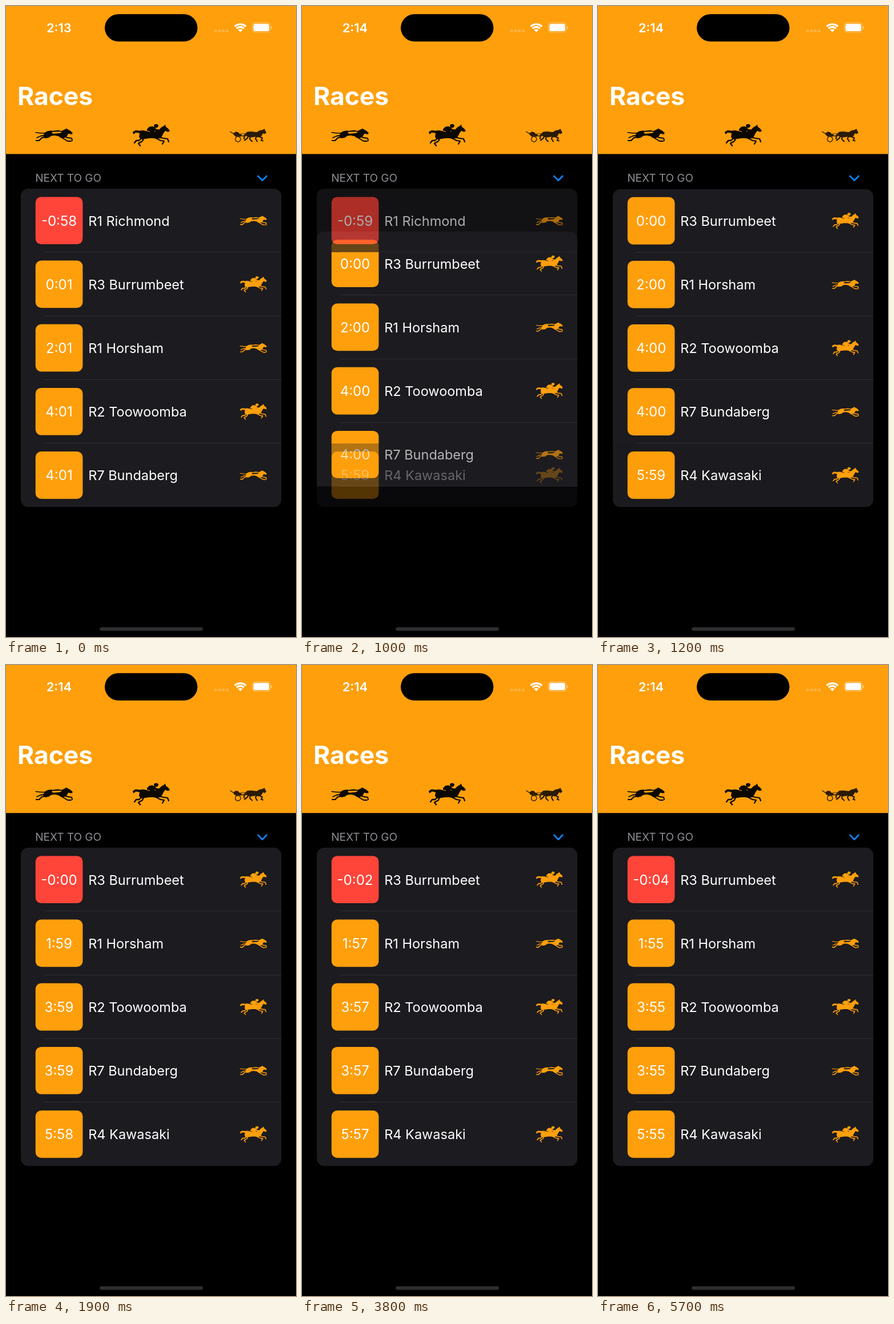
Recreate the animation shown at these times as an HTML page with a canvas. Size 508 by 1102 pixels, loop 5900 ms.

```html
<!DOCTYPE html>
<html lang="en">
<head>
<meta charset="utf-8">
<title>Races</title>
<style>
html, body { margin: 0; width: 100%; height: 100%; overflow: hidden; background: #000; }
canvas { display: block; width: 508px; height: 1102px; }
</style>
</head>
<body>
<canvas id="stage"></canvas>
<script>
const W = 508, H = 1102, LOOP = 5900, STEP = 100;
const ORANGE = '#ff9f0c', RED = '#ff453a', CARD = '#1c1b1f', RULE = '#302f33';
const FONT = 'Inter, "Liberation Sans", sans-serif';
const TOP = 319.2, ROW = 111.17, LEFT = 25.9, WIDE = 456.4;
const MOVE_AT = 859, MOVE_FOR = 356, CLOCK_AT = 700;

const ratio = window.devicePixelRatio || 1;
const makeContext = canvas => {
  canvas.width = W * ratio;
  canvas.height = H * ratio;
  const c = canvas.getContext('2d');
  c.scale(ratio, ratio);
  return c;
};
const ctx = makeContext(document.getElementById('stage'));
const layer = makeContext(document.createElement('canvas'));

// Silhouettes: filled shapes plus stroked limbs.
const icons = {
  dog: {
    height: 25,
    fill: new Path2D('M15 9C19 5 24 4 30 5L38 4L46 5L50 3L54 1L57 3L61 5L65 9L63 11L57 10L55 14L51 17C47 19 44 18 41 15C36 13 31 13 27 14L23 17L17 18L13 15Z' +
      'M28 7L30 10L43 9L46 6.5L36 6.5Z'),
    lines: [
      ['M17 9L9 9L0 8', 1.5], ['M20 16L11 17L6 22L1 22', 2.2],
      ['M16 13L9 14L2 17', 1.8], ['M50 15L56 17L63 18L64 22', 2],
      ['M46 17L51 20L56 23L62 23', 2]
    ]
  },
  horse: {
    height: 39,
    fill: new Path2D('M0 14L5 11L13 12C18 10 24 13 30 14L38 13L44 12L50 6L55 3L57 1L58 5L62 8L65 12L62 14L57 12L54 16L51 22C47 26 42 27 37 25L29 25L22 26L15 27L11 23L12 16L6 15L1 18Z' +
      'M25 9L29 5L34 4L39 6L41 9L47 10L45 13L38 12L36 17L33 21L30 19L30 13L25 12Z' +
      'M37 3A4 3.3 0 1 1 45 4L42 7L38 6Z'),
    lines: [
      ['M15 25L11 29L6 29L3 33', 2.4], ['M19 25L17 30L10 34L13 38', 2.2],
      ['M45 23L54 25L61 26L63 31', 2.2], ['M41 25L49 29L55 30L52 35', 2.2]
    ]
  },
  trot: {
    height: 24,
    fill: new Path2D('M28 6C33 4 39 5 46 6L51 3L56 2L60 0L61 3L63 6L61 9L57 8L55 12L51 15L43 14L36 15L30 14L27 10Z' +
      'M6 7L10 5L14 6L16 9L20 10L19 13L13 12L10 13L6 11Z'),
    lines: [
      ['M0 5L6 9L10 13L26 12L45 11', 1.4], ['M14 9L30 8L56 5', .8],
      ['M29 8L25 11L24 17', 2.4], ['M18 18A4.7 4.7 0 1 1 8.6 18A4.7 4.7 0 1 1 18 18', 1.3],
      ['M32 13L29 17L25 20M35 14L34 18L38 22', 2.2],
      ['M46 13L44 17L47 22M50 13L56 16L54 20L57 21', 2.2]
    ]
  }
};
for (const icon of Object.values(icons)) {
  icon.lines = icon.lines.map(([d, width]) => ({ path: new Path2D(d), width }));
}

const tickTimes = [600, 1600, 2600, 3700, 4700, 5700];
const lateTicks = [1900, 2900, 3900, 4900];
const races = [
  { name: 'R1 Richmond', left: -58.95, kind: 'dog', ticks: tickTimes },
  { name: 'R3 Burrumbeet', left: 1.05, kind: 'horse', ticks: tickTimes },
  { name: 'R1 Horsham', left: 121.05, kind: 'dog', ticks: tickTimes },
  { name: 'R2 Toowoomba', left: 241.05, kind: 'horse', ticks: tickTimes },
  { name: 'R7 Bundaberg', left: 241.05, kind: 'dog', ticks: tickTimes },
  { name: 'R4 Kawasaki', left: 359.7, kind: 'horse', ticks: lateTicks }
];

function box(c, x, y, w, h, r, color) {
  c.fillStyle = color;
  c.beginPath();
  c.roundRect(x, y, w, h, r);
  c.fill();
}

function label(c, text, x, y, size, weight = 400, color = '#fff', align = 'left') {
  c.font = `${weight} ${size}px ${FONT}`;
  c.fillStyle = color;
  c.textAlign = align;
  c.fillText(text, x, y);
}

function drawIcon(c, kind, x, y, scale, color) {
  const icon = icons[kind];
  c.save();
  c.translate(x, y);
  c.scale(scale, scale);
  c.fillStyle = c.strokeStyle = color;
  c.lineCap = c.lineJoin = 'round';
  c.fill(icon.fill);
  for (const { path, width } of icon.lines) {
    c.lineWidth = width;
    c.stroke(path);
  }
  c.restore();
}

function countdown(seconds) {
  const s = Math.floor(Math.abs(seconds));
  return (seconds < 0 ? '-' : '') + Math.floor(s / 60) + ':' + String(s % 60).padStart(2, '0');
}

function drawRow(c, race, y, time, { first, last }) {
  const left = race.left - race.ticks.filter(at => at <= time).length;
  const top = Math.round(y), bottom = Math.round(y + ROW), mid = y + 55.6;
  const a = first ? 13 : 0, b = last ? 13 : 0;
  box(c, LEFT, top, WIDE, bottom - top, [a, a, b, b], CARD);
  if (!last) {
    c.fillStyle = RULE;
    c.fillRect(67, bottom - 1, LEFT + WIDE - 67, 1);
  }
  box(c, 51.7, mid - 41.4, 82.7, 82.7, 10, left < 0 ? RED : ORANGE);
  label(c, countdown(left), 93, mid + 8.8, 24, 400, '#fff', 'center');
  label(c, race.name, 144.2, mid + 8.8, 23.5);
  const scale = 47 / 65;
  drawIcon(c, race.kind, 410, mid - icons[race.kind].height * scale / 2, scale, ORANGE);
}

// Rows that appear or vanish are blended as one group.
function fadeRow(race, y, time, ends, alpha) {
  layer.clearRect(0, 0, W, H);
  drawRow(layer, race, y, time, ends);
  ctx.globalAlpha = alpha;
  ctx.drawImage(layer.canvas, 0, 0, W, H);
  ctx.globalAlpha = 1;
}

// Cubic ease in and out with handles at .42 and .58.
function ease(x) {
  if (x <= 0 || x >= 1) return Math.min(1, Math.max(0, x));
  let lo = 0, hi = 1;
  for (let i = 0; i < 24; i++) {
    const u = (lo + hi) / 2, v = 1 - u;
    if (3 * v * v * u * .42 + 3 * v * u * u * .58 + u ** 3 < x) lo = u; else hi = u;
  }
  return lo * lo * (3 - 2 * lo);
}

function drawList(time) {
  const p = ease((time - MOVE_AT) / MOVE_FOR);
  const moving = p > 0;
  const slot = i => TOP + i * ROW;
  for (let i = 1; i < 5; i++) {
    drawRow(ctx, races[i], slot(i - p), time, { first: moving && i === 1, last: !moving && i === 4 });
  }
  if (moving) fadeRow(races[5], slot(4), time, { last: true }, p);
  if (p < 1) fadeRow(races[0], slot(0), time, { first: true }, 1 - p);
}

function drawStatus(time) {
  label(ctx, time < CLOCK_AT ? '2:13' : '2:14', 92.8, 46, 21.8, 600, '#fff', 'center');
  box(ctx, 173, 14.3, 162.4, 47.8, 23.9, '#000');
  for (let i = 0; i < 4; i++) box(ctx, 364.7 + i * 6.8, 41, 5, 5, 2, 'rgba(255,255,255,.22)');

  ctx.strokeStyle = ctx.fillStyle = '#fff';
  ctx.lineCap = 'butt';
  ctx.lineWidth = 3.2;
  const arc = r => ctx.arc(410.5, 45.8, r, -Math.PI * .75, -Math.PI * .25);
  for (const r of [9.1, 14]) {
    ctx.beginPath();
    arc(r);
    ctx.stroke();
  }
  ctx.beginPath();
  ctx.moveTo(410.5, 45.8);
  arc(5.6);
  ctx.fill();

  ctx.strokeStyle = 'rgba(255,255,255,.4)';
  ctx.lineWidth = 1.2;
  ctx.beginPath();
  ctx.roundRect(431.5, 29.4, 31.3, 16.6, 5);
  ctx.stroke();
  box(ctx, 433.4, 31.3, 27.5, 12.8, 3.4, '#fff');
  box(ctx, 464.2, 35, 1.8, 5.6, [0, 2, 2, 0], 'rgba(255,255,255,.45)');
}

function drawHeader(time) {
  ctx.fillStyle = ORANGE;
  ctx.fillRect(0, 0, W, 258.5);
  ctx.fillStyle = 'rgba(0,0,0,.025)';
  ctx.fillRect(0, 193, W, 1);
  drawStatus(time);
  label(ctx, 'Races', 20, 173.4, 44.4, 700);
  drawIcon(ctx, 'dog', 52, 213, 1, '#0c0802');
  drawIcon(ctx, 'horse', 222, 206, 1, '#0c0802');
  drawIcon(ctx, 'trot', 393, 214.5, 1, '#2a1b05');
  label(ctx, 'NEXT TO GO', 51.2, 306.8, 19, 400, '#8d8d93');
  ctx.strokeStyle = '#0a84ff';
  ctx.lineWidth = 2.7;
  ctx.lineCap = ctx.lineJoin = 'round';
  ctx.stroke(new Path2D('M441.5 297L449 304.7L456.5 297'));
}

function draw(time) {
  ctx.fillStyle = '#000';
  ctx.fillRect(0, 0, W, H);
  drawHeader(time);
  drawList(time);
  box(ctx, 164, 1085, 181, 6.2, 3.1, '#2e2d30');
}

const start = performance.now();
function loop() {
  const time = (performance.now() - start) % LOOP;
  draw(Math.floor(time / STEP) * STEP);
  requestAnimationFrame(loop);
}
loop();
</script>
</body>
</html>
```
